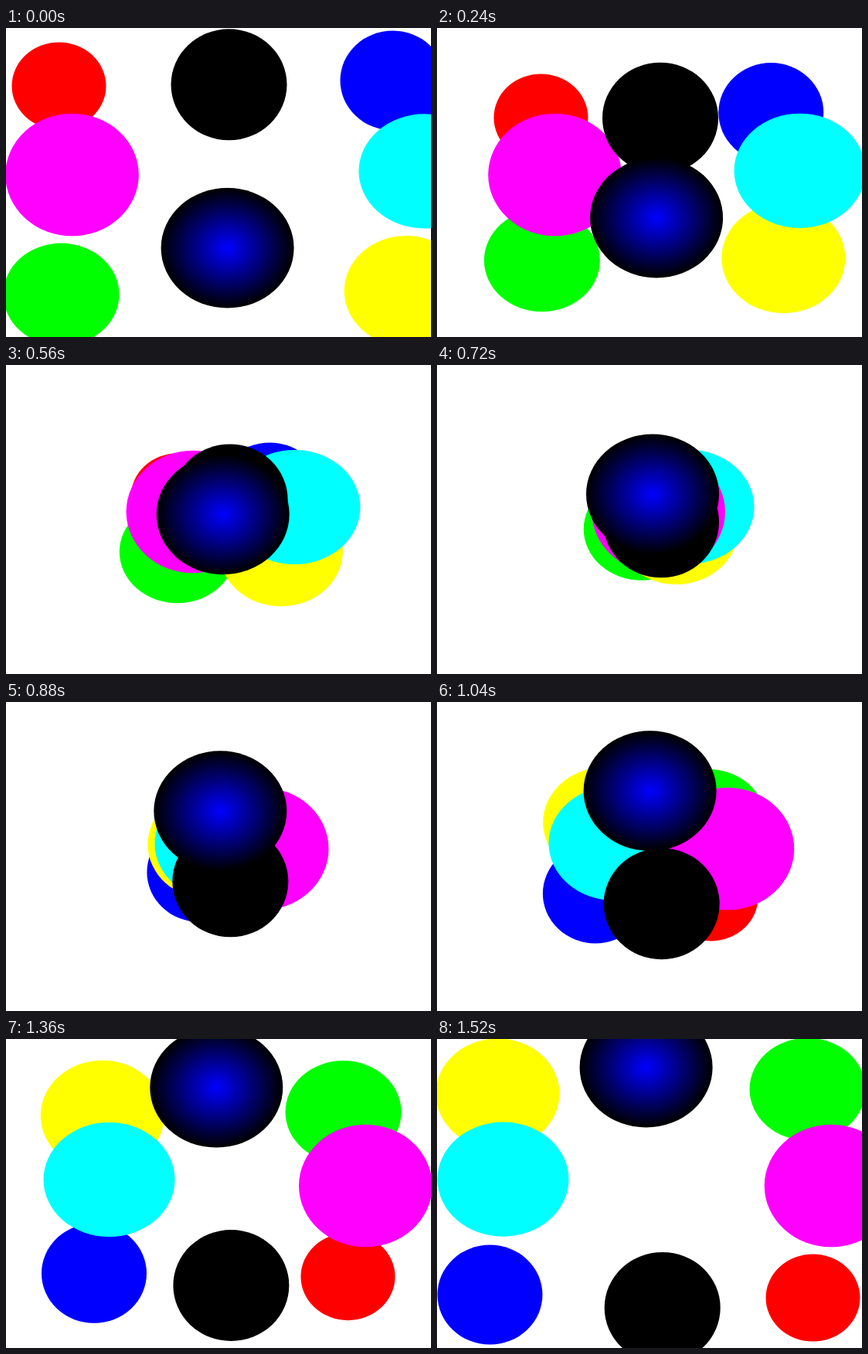
Recreate the animation shown at these times as an HTML page. Size 550 px wide and 400 px high, loop 1600 ms.

```html
<!DOCTYPE html>
<html lang="en">
<head>
<meta charset="utf-8">
<title>Crossing discs</title>
<style>
  html, body { margin: 0; width: 100%; height: 100%; overflow: hidden; background: #fff; }
  svg { display: block; width: 550px; height: 400px; }
</style>
</head>
<body>
<svg id="stage" viewBox="0 0 550 400">
  <defs>
    <radialGradient id="glow">
      <stop offset="0" stop-color="#00f"/>
      <stop offset="1" stop-color="#000"/>
    </radialGradient>
  </defs>
</svg>
<script>
  const STEP = 80, COUNT = 20;

  // Back to front: fill, radii, start centre, end centre
  const discs = [
    ['#f00', 61, 56.5, 68.5, 75, 486.5, 335],
    ['#0f0', 75, 66.4, 71.5, 345, 479.5, 65],
    ['#00f', 68, 64.5, 500.5, 68, 68.5, 331],
    ['#ff0', 80, 71.4, 517.7, 340.4, 78.5, 70.7],
    ['#0ff', 85, 74.1, 541.5, 185.4, 85.5, 181.6],
    ['#f0f', 86.3, 79.3, 85.5, 190, 510, 190],
    ['#000', 75, 72, 288.5, 73.3, 291.7, 347.9],
    ['url(#glow)', 86, 77.8, 286.6, 284.8, 270.6, 36.7]
  ].map(([fill, rx, ry, x0, y0, x1, y1]) => {
    const el = document.createElementNS('http://www.w3.org/2000/svg', 'ellipse');
    setAttrs(el, { fill, rx, ry });
    document.getElementById('stage').append(el);
    return { el, x0, y0, x1, y1 };
  });

  function setAttrs(el, attrs) {
    for (const name in attrs) el.setAttribute(name, attrs[name]);
  }

  const lerp = (a, b, u) => a + (b - a) * u;

  function draw(time) {
    const step = Math.floor(time / STEP) % COUNT;
    const u = step / (COUNT - 1);
    for (const { el, x0, y0, x1, y1 } of discs) {
      setAttrs(el, { cx: lerp(x0, x1, u), cy: lerp(y0, y1, u) });
    }
  }

  let start;
  function tick(now) {
    start ??= now;
    draw(now - start);
    requestAnimationFrame(tick);
  }

  draw(0);
  requestAnimationFrame(tick);
</script>
</body>
</html>
```
